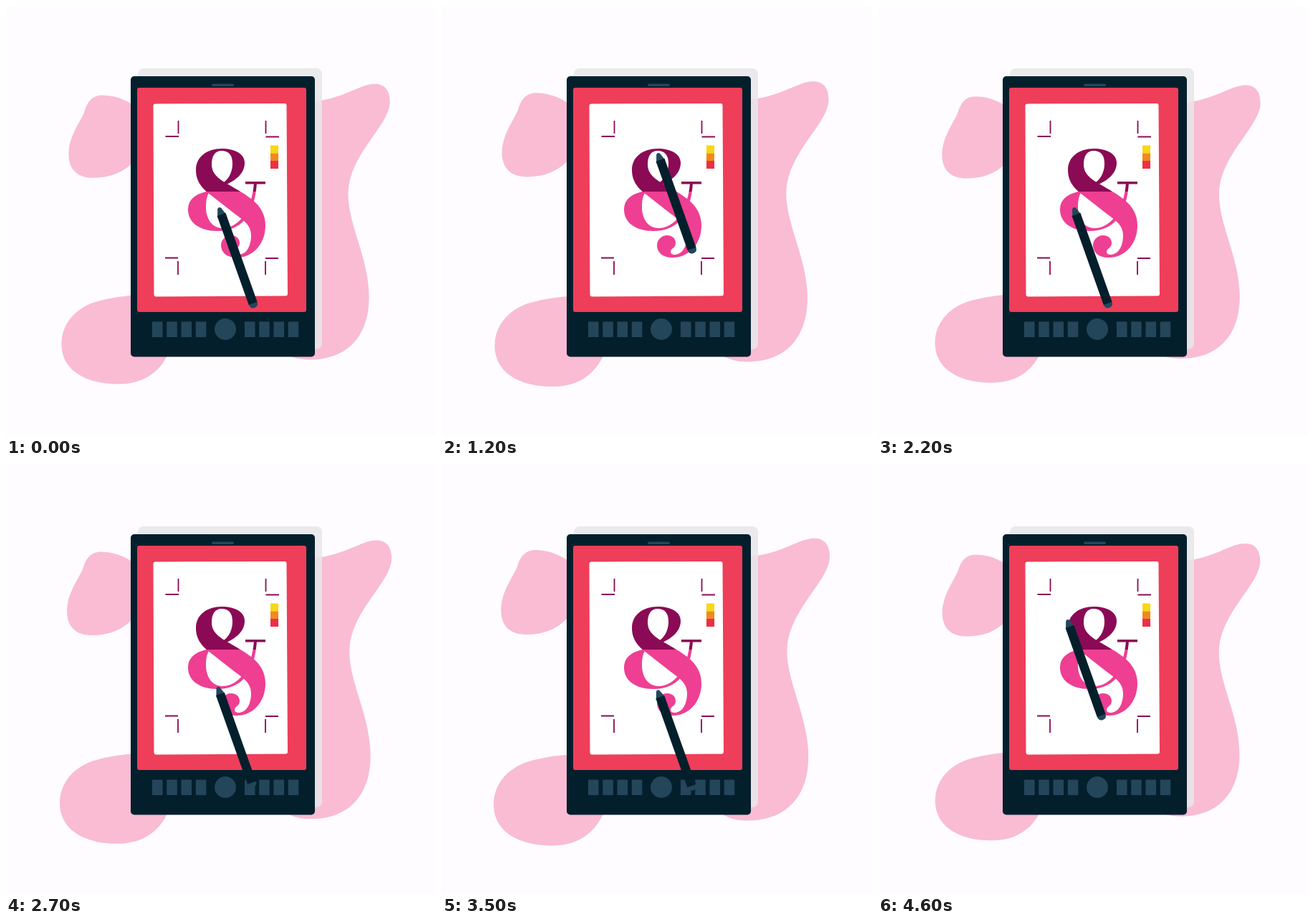
Write an HTML page that moves like this. It is 600 px wide and 600 px high and loops after 4700 ms.

```html
<!DOCTYPE html>
<html lang="en">
<head>
<meta charset="utf-8">
<title>Drawing tablet</title>
<style>
html, body { margin: 0; width: 100%; height: 100%; overflow: hidden; background: #fefcff; }
svg { display: block; width: 100vw; height: 100vh; }
</style>
</head>
<body>
<svg viewBox="0 0 600 600">
  <defs>
    <linearGradient id="ink" gradientUnits="userSpaceOnUse" x1="0" y1="198" x2="0" y2="352">
      <stop offset=".396" stop-color="#8b0a55"/>
      <stop offset=".396" stop-color="#ee3f93"/>
    </linearGradient>
  </defs>

  <g id="blob" fill="#f9bcd3">
    <path d="M190 148C174 134 156 125 135 125C121 125 114 134 110 148C105 161 88 182 88 207C88 229 101 240 122 240C145 240 163 233 177 219L200 200Z"/>
    <path d="M200 402C174 403 147 406 124 413C95 423 78 445 78 471C78 508 112 527 157 527C193 527 214 510 226 486L240 440Z"/>
    <path d="M420 134C453 134 480 119 499 112C520 105 535 111 535 134C535 168 477 207 477 263C477 306 506 352 506 406C506 463 473 493 424 493C411 493 401 491 390 485L380 300Z"/>
  </g>

  <rect x="184" y="87" width="257" height="392" rx="8" fill="#e8e6e9" opacity=".88"/>
  <rect x="174" y="98" width="257" height="391.5" rx="5" fill="#041f2c"/>
  <rect x="183" y="114" width="236" height="313" rx="3" fill="#ee3e5a"/>
  <path d="M208 139L389 138.500L390.500 402L209 403Z" fill="#fff" stroke="#fff" stroke-width="5" stroke-linejoin="round"/>

  <g fill="#24465a">
    <rect x="287" y="108.500" width="31" height="3.500" rx="1.700"/>
    <circle cx="306" cy="451" r="15"/>
    <path id="keys" d=""/>
  </g>

  <path d="M240.500 160V178M222.500 182H241M362.500 160V178M362.500 182.500H381M222 351.500H240M240 356V375M362 352H380M362 356V375"
        fill="none" stroke="#8b0a55" stroke-width="1.800"/>

  <rect x="369" y="194.500" width="11" height="11" fill="#f7d716"/>
  <rect x="369" y="205.500" width="11" height="11" fill="#f08a1d"/>
  <rect x="369" y="216" width="11" height="11" fill="#ee2f45"/>

  <!-- ampersand: diagonal with hook, upper bowl, lower bowl, serif -->
  <g fill="url(#ink)">
    <path d="M287 221C287 236 300 243 312 250C335 264 362 276 362 306C362 334 342 352 321 351C307 351 300 343 300 334C300 326 307 320 314 320C322 320 326 325 326 331C326 338 319 338 319 343C319 346 322 347 325 347C337 346 342 333 342 320C342 305 330 298 318 289L281 260C270 251 265 241 265 229C265 210 281 199 301 199V202C291 202 287 210 287 221Z"/>
    <path d="M300 199C321 199 333 207 333 219C333 234 320 243 308 249L304 246C312 240 316 230 316 220C316 209 312 202 300 202Z"/>
    <path d="M285 258C266 261 254 269 254 284C254 302 270 314 295 314C330 314 347 290 350 247H346C343 285 325 310 302 310C287 310 279 296 279 281C279 272 280 266 283 261Z"/>
    <path d="M334 245H362V248.500H334Z"/>
  </g>

  <g id="pen">
    <path d="M-6.300 12L-2.500 1.500Q0 -1.500 2.500 1.500L6.300 12Z" fill="#21485b"/>
    <path d="M-6 141H6V144Q5 148.500 0 148.500Q-5 148.500 -6 144Z" fill="#24465a"/>
    <path d="M-6.300 10.500H6.300V142H-6.300Z" fill="#041f2c"/>
  </g>
</svg>
<script>
const LOOP = 4700, STEP = 100;
const $ = id => document.getElementById(id);

$('keys').setAttribute('d',
  [204, 224.3, 244.500, 264.800, 333, 353.200, 373.500, 393.700].map(x => `M${x} 440.500h14.500v21.500h-14.500z`).join(''));

// Pen tip: [time, x, y]
const tip = [
  [0, 297, 281], [700, 278, 222], [1200, 301, 205], [1700, 324, 224], [2200, 273, 281],
  [2650, 292, 309], [3100, 323, 318], [4000, 266, 298], [4600, 264, 217]
];

function slope(i, k) {
  const a = tip[Math.max(i - 1, 0)], b = tip[Math.min(i + 1, tip.length - 1)];
  return (b[k] - a[k]) / (b[0] - a[0]);
}

function tipAt(t, k) {
  let i = 0;
  while (i < tip.length - 2 && t >= tip[i + 1][0]) i++;
  const a = tip[i], b = tip[i + 1], d = b[0] - a[0], u = (t - a[0]) / d, v = 1 - u;
  return v * v * (1 + 2 * u) * a[k] + u * u * (3 - 2 * u) * b[k]
    + d * u * v * (v * slope(i, k) - u * slope(i + 1, k));
}

// The blob shrinks a little faster than it grows.
const PEAK = 850, FALL = 1070, PERIOD = 2460;
function blobScale(t) {
  const p = (t - PEAK + PERIOD) % PERIOD;
  const turn = p < FALL ? p / FALL : 1 + (p - FALL) / (PERIOD - FALL);
  return 1.0095 + 0.0197 * Math.cos(Math.PI * turn);
}

function draw(now) {
  const t = Math.floor(now % LOOP / STEP) * STEP;
  $('blob').setAttribute('transform', `translate(306.5 318) scale(${blobScale(t)}) translate(-306.5 -318)`);
  $('pen').setAttribute('transform', `translate(${tipAt(t, 1)} ${tipAt(t, 2)}) rotate(-19.6)`);
}

const start = performance.now();
function tick() {
  draw(performance.now() - start);
  requestAnimationFrame(tick);
}
tick();
</script>
</body>
</html>
```
